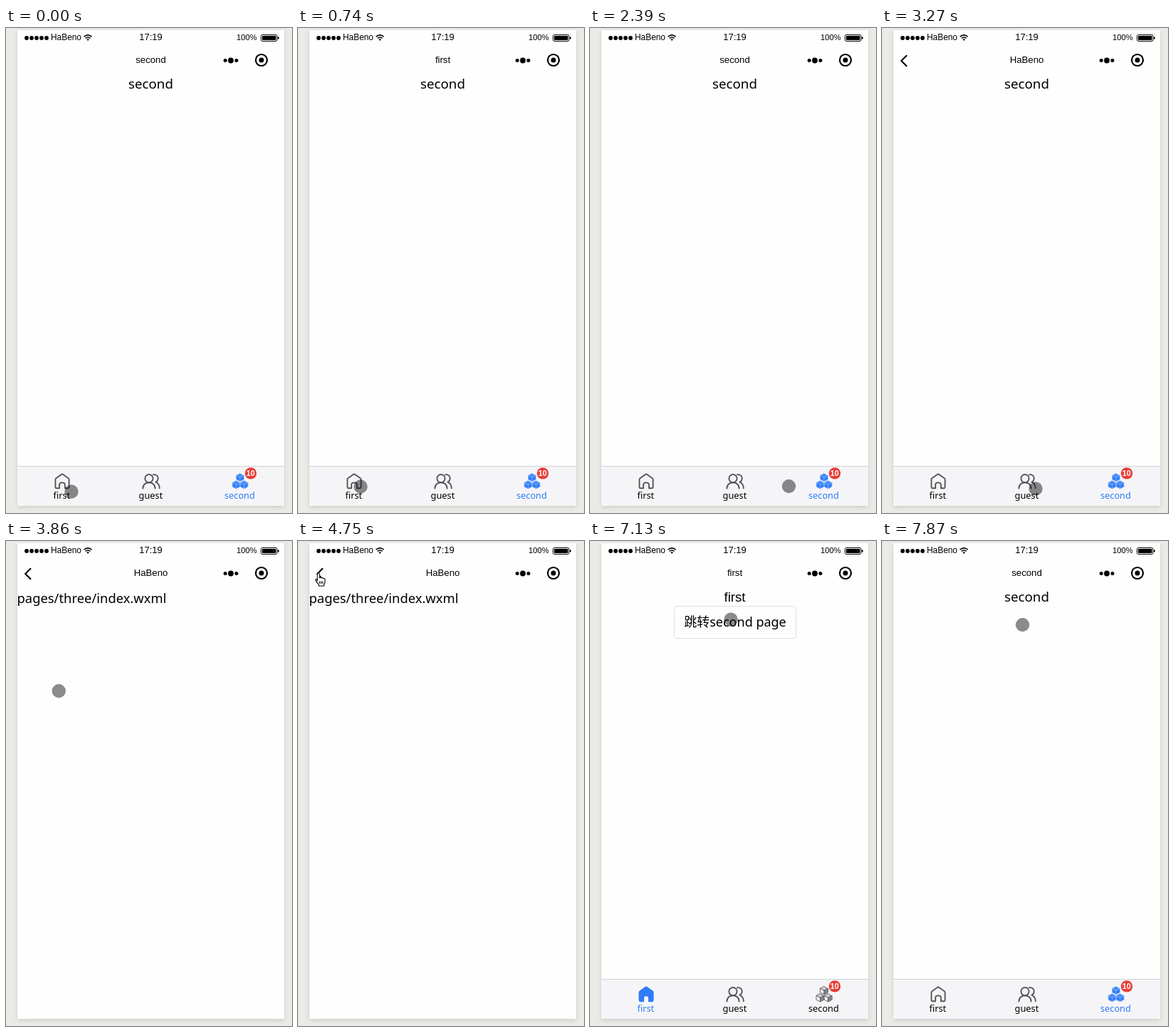
An HTML page that plays this animation: 402 by 680 pixels, repeating every 8 s.

```html
<!DOCTYPE html>
<html lang="en">
<head>
<meta charset="utf-8">
<title>Tab bar demo</title>
<style>
  html, body { margin: 0; width: 100%; height: 100%; overflow: hidden; background: #ebeae6; }
  #phone { position: absolute; left: 16px; top: 3px; width: 375px; height: 667px; background: #fefefe; box-shadow: 0 2px 6px rgba(0, 0, 0, .13); }
  svg { position: absolute; left: 0; top: 0; }
  text { font-family: "Liberation Sans", Arial, sans-serif; }
  .mid { text-anchor: middle; }
  .page, .tab text { font-family: "Noto Sans", "Noto Sans CJK SC", sans-serif; }
  .page { font-size: 18.7px; }
  .tab { fill: none; stroke: #555558; stroke-width: 1.9; stroke-linejoin: round; stroke-linecap: round; }
  .tab text { font-size: 12.8px; fill: #000; stroke: none; }
  .tab.on text { fill: #2f7cf6; }
  .on .house { fill: #2f7cf6; stroke: #2f7cf6; }
  .cube { stroke: #5a5a5c; stroke-width: .9; }
  .cube .top { fill: #d4d4d6; }
  .cube .left { fill: #f4f4f6; }
  .cube .right { fill: #858588; }
  .on .cube { stroke: #8cb8ff; stroke-width: .7; }
  .on .cube path { fill: #2f7cf6; }
  .on .cube .top { fill: #4288fa; }
</style>
</head>
<body>
<div id="phone"></div>
<svg width="402" height="680" viewBox="0 0 402 680">
  <g id="status">
    <g id="signal"></g>
    <text x="63" y="17.3" font-size="11.9">HaBeno</text>
    <g fill="none" stroke="#000" stroke-width="1.6">
      <path d="M109.6 12.2Q115 7.6 120.6 12.2M111.6 14.4Q115 11.6 118.6 14.4"/>
      <path d="M113.2 15.8Q115 14.6 117 15.8L115.1 18Z" fill="#000" stroke="none"/>
    </g>
    <text class="mid" x="203.5" y="17.4" font-size="13">17:19</text>
    <text x="324" y="17.3" font-size="11.2">100%</text>
    <rect x="358.5" y="9.5" width="22.5" height="9" rx="2" fill="none" stroke="#000"/>
    <rect x="360" y="11" width="19.5" height="6" rx=".8"/>
    <path d="M382 12.2Q384 12.4 384 14T382 15.8Z"/>
  </g>
  <g id="header">
    <path id="back" d="M35 38.3L27.2 46L35 53.7" fill="none" stroke="#000" stroke-width="2.1"/>
    <text id="title" class="mid" x="203.5" y="49" font-size="13.2"></text>
    <circle cx="308.2" cy="45.5" r="2.5"/>
    <circle cx="316" cy="45.5" r="3.9"/>
    <circle cx="323.9" cy="45.5" r="2.5"/>
    <circle cx="359" cy="45" r="8" fill="none" stroke="#000" stroke-width="2.2"/>
    <circle cx="359" cy="45" r="3.5"/>
  </g>
  <g id="first" class="page">
    <text class="mid" x="203.5" y="85">first</text>
    <rect x="118.5" y="91.5" width="171" height="45" rx="4" fill="none" stroke="#e0e0e0"/>
    <text class="mid" x="204" y="120" font-size="18" style="font-family:inherit">跳转second page</text>
  </g>
  <g id="second" class="page"><text class="mid" x="203.5" y="85" style="font-family:inherit">second</text></g>
  <g id="three" class="page"><text x="15.5" y="87" font-size="18.4" style="font-family:inherit">pages/three/index.wxml</text></g>
  <g id="bar">
    <path d="M16 614h375v56H16z" fill="#f5f5f8"/>
    <path d="M16 614.5h375" stroke="#d3d3d5"/>
    <g id="tabFirst" class="tab">
      <path class="house" d="M69.4 633.2Q69.4 632 70.3 631.3L77.8 625.9Q79 625.1 80.2 625.9L87.7 631.3Q88.6 632 88.6 633.2V643.7Q88.6 645.2 87.1 645.2H82.9V640.6Q82.9 637.4 79 637.4T75.1 640.6V645.2H70.9Q69.4 645.2 69.4 643.7Z"/>
      <text class="mid" x="78.3" y="660">first</text>
    </g>
    <g class="tab">
      <circle cx="201" cy="631.6" r="5.6"/>
      <path d="M192.4 645.6C192.4 634.4 209.6 634.4 209.6 645.6M207 626.2C214.4 625.6 215.8 633.4 210.4 636.6C214 638.2 215.8 641 215.8 645.2"/>
      <text class="mid" x="203.4" y="660">guest</text>
    </g>
    <g id="tabSecond" class="tab">
      <g id="cubes"></g>
      <text class="mid" x="328.4" y="660">second</text>
    </g>
    <circle cx="344" cy="624.4" r="8.2" fill="#ea3e37"/>
    <text class="mid" x="343.8" y="628.4" font-size="10.8" font-weight="bold" fill="#fff">10</text>
  </g>
  <circle id="touch" r="9.7" fill="#000" fill-opacity=".45"/>
  <path id="hand" fill="#fff" stroke="#000" stroke-width="1.1" stroke-linejoin="round"
    d="M-1.5 10V.8Q-1.5 -.8 0 -.8T1.6 .8V5.8Q3 4.4 4.3 6Q5.9 5 6.9 6.8Q9.3 6.2 9.3 8.6V11.6Q9.3 13.4 7.8 15V17.2H.6V15.4Q-1.4 13.6 -3.9 9.6Q-4.4 7.8 -2.9 7.8Q-2 8 -1.5 10ZM1.8 10.6V14M4 10.6V14M6.2 10.6V14"/>
</svg>
<script>
const LOOP = 8000, TICK = 148.3;
const $ = id => document.getElementById(id);

// tick, header title, page
const scenes = [
  [0, "second", "second"], [5, "first", "second"], [6, "first", "first"],
  [12, "second", "first"], [13, "second", "second"],
  [21, "HaBeno", "second"], [23, "HaBeno", "three"],
  [35, "second", "three"], [36, "second", "second"],
  [42, "first", "second"], [43, "first", "first"],
  [50, "second", "first"], [51, "second", "second"]
];

// tick, x, y of the pointer
const path = [
  [0, 92, 650], [1, 92, 650], [3, 88, 643], [5, 88, 643],
  [9, 356, 642], [10, 343, 637], [13, 343, 637],
  [19, 216, 648], [20, 216, 648], [21, 216, 646], [22, 216, 646],
  [28, 27, 65], [32, 28.7, 45.8], [35, 28.7, 45.8],
  [40, 82, 645], [43, 82, 645],
  [48, 198, 110], [50, 198, 109], [52, 198, 109], [53, 197.5, 117.5]
];

const lastAt = (rows, k) => rows.findLastIndex(r => r[0] <= k);

function pointerAt(k) {
  const i = lastAt(path, k);
  const [t0, x0, y0] = path[i];
  const [t1, x1, y1] = path[i + 1] || [t0 + 1, x0, y0];
  const e = (1 - Math.cos(Math.PI * (k - t0) / (t1 - t0))) / 2;
  return [x0 + (x1 - x0) * e, y0 + (y1 - y0) * e];
}

const cube = ([x, y]) => `<g class="cube" transform="translate(${x} ${y})">
  <path class="top" d="M0 -5.6L5.2 -2.8L0 0L-5.2 -2.8Z"/>
  <path class="left" d="M-5.2 -2.8L0 0V5.6L-5.2 2.9Z"/>
  <path class="right" d="M5.2 -2.8L0 0V5.6L5.2 2.9Z"/></g>`;

$("cubes").innerHTML = [[329, 630.2], [323.5, 640.4], [334.7, 640.4]].map(cube).join("");
$("signal").innerHTML = [0, 1, 2, 3, 4]
  .map(i => `<circle cx="${29 + i * 7}" cy="14" r="2.9"/>`).join("");

const show = (id, on) => $(id).style.display = on ? "" : "none";

function draw(time) {
  // The screen refreshes in fixed ticks
  const k = Math.floor((time % LOOP + 5) / TICK);
  const [, title, page] = scenes[lastAt(scenes, k)];
  $("title").textContent = title;
  show("back", title === "HaBeno");
  for (const id of ["first", "second", "three"]) show(id, id === page);
  show("bar", page !== "three");
  $("tabFirst").classList.toggle("on", page === "first");
  $("tabSecond").classList.toggle("on", page === "second");

  const [x, y] = pointerAt(k);
  const inHeader = y < 65;
  show("touch", !inHeader);
  show("hand", inHeader);
  $(inHeader ? "hand" : "touch").setAttribute("transform", `translate(${x} ${y})`);
}

const start = performance.now();
function loop() {
  draw(performance.now() - start);
  requestAnimationFrame(loop);
}
loop();
</script>
</body>
</html>
```
